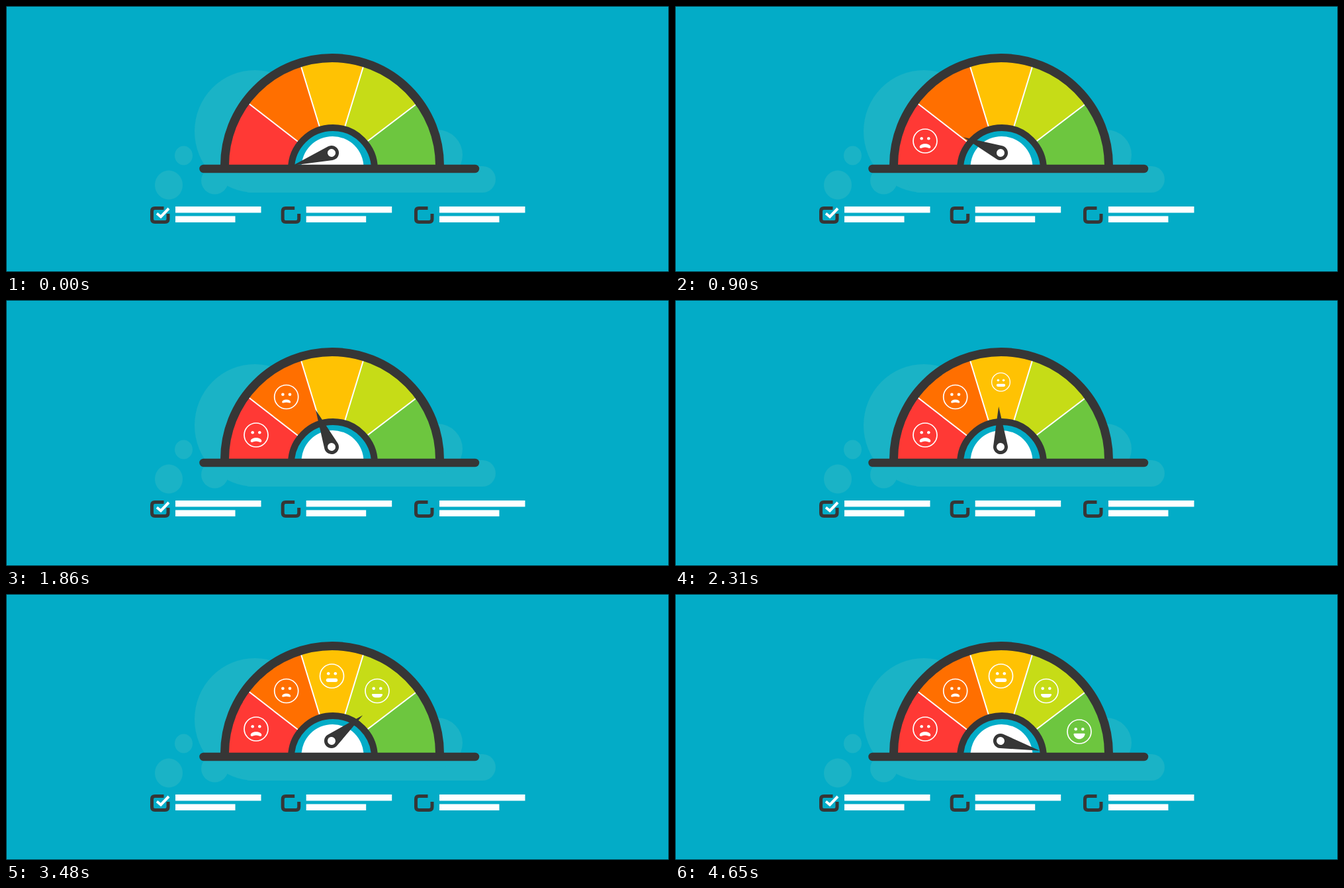
Write an HTML page that moves like this. It is 1002 px wide and 402 px high and loops after 5610 ms.

```html
<!DOCTYPE html>
<html lang="en">
<head>
<meta charset="utf-8">
<title>Satisfaction gauge</title>
<style>
  html, body { margin: 0; width: 100%; height: 100%; overflow: hidden; background: #03acc7; }
  svg { display: block; width: 100%; height: 100%; }
</style>
</head>
<body>
<svg viewBox="0 0 1002 402">
  <defs>
    <clipPath id="dial"><path d="M335 246V241A158 158 0 0 1 651 241V246Z"/></clipPath>
    <clipPath id="above"><rect width="1002" height="246"/></clipPath>
    <g id="item">
      <path d="M20.5 2.5H7Q2.5 2.5 2.5 7V19Q2.5 23.5 7 23.5H22.5Q27 23.5 27 19V11" fill="none" stroke="#363636" stroke-width="5"/>
      <path d="M38 0H167.5V9.5H38ZM38 14.5H128.5V24H38Z" fill="#fff"/>
    </g>
    <g id="head">
      <circle r="18" fill="none" stroke="#fff" stroke-width="1.7"/>
      <circle cx="-5.3" cy="-3.7" r="2.3"/>
      <circle cx="5.3" cy="-3.7" r="2.3"/>
    </g>
  </defs>

  <rect width="1002" height="402" fill="#03acc7"/>

  <g fill="#1ab3c6">
    <ellipse cx="376" cy="189.5" rx="91" ry="92.5"/>
    <rect x="350" y="242" width="390" height="40" rx="20"/>
    <circle cx="652" cy="225" r="38"/>
    <circle cx="315.5" cy="264" r="20.5"/>
    <ellipse cx="268.5" cy="226" rx="13.5" ry="14.5"/>
    <ellipse cx="246" cy="270.5" rx="21" ry="22"/>
  </g>

  <g clip-path="url(#dial)">
    <path d="M493 245L334 122V250H493Z" fill="#ff3935"/>
    <path d="M493 245L334 122V54H434.5Z" fill="#ff6f00"/>
    <path d="M493 245L434.5 54H551.5Z" fill="#ffc203"/>
    <path d="M493 245L551.5 54H652V124Z" fill="#c6dc17"/>
    <path d="M493 245L652 124V250H493Z" fill="#6dc63f"/>
    <path d="M334 122L493 245L434.5 54M551.5 54L493 245L652 124" fill="none" stroke="#fff" stroke-width="2"/>
  </g>
  <path d="M330.5 246V241A162.5 162.5 0 0 1 655.5 241V246" fill="none" stroke="#363636" stroke-width="13"/>
  <g clip-path="url(#above)">
    <circle cx="494" cy="247" r="63" fill="#03acc7" stroke="#363636" stroke-width="10"/>
    <circle cx="493.5" cy="244" r="47" fill="#fff"/>
  </g>
  <path d="M298.5 246H709" stroke="#363636" stroke-width="12.5" stroke-linecap="round"/>

  <use href="#item" x="218" y="303"/>
  <use href="#item" x="415.7" y="303"/>
  <use href="#item" x="617" y="303"/>
  <path d="M228 313.5L234 318.5L246 306" fill="none" stroke="#fff" stroke-width="4"/>

  <!-- Each face: centre and the time it starts to grow -->
  <g fill="#fff">
    <g class="face" data-x="378" data-y="204" data-start="120">
      <use href="#head"/>
      <path d="M-8.3 9C-8.3 2.5 8.3 2.5 8.3 9C8.3 11.5 6 11.3 4 10.2Q0 8.6 -4 10.2C-6 11.3 -8.3 11.5 -8.3 9Z"/>
    </g>
    <g class="face" data-x="423.7" data-y="146.5" data-start="930">
      <use href="#head"/>
      <path d="M-6.5 8C-6.5 2.5 6.5 2.5 6.5 8Q6.5 9.6 4.5 8.9Q0 7.6 -4.5 8.9Q-6.5 9.6 -6.5 8Z"/>
    </g>
    <g class="face" data-x="492.5" data-y="124" data-start="1940">
      <use href="#head"/>
      <path d="M-6 3.6H6A2.7 2.7 0 0 1 6 9H-6A2.7 2.7 0 0 1 -6 3.6Z"/>
    </g>
    <g class="face" data-x="561" data-y="146.5" data-start="2790">
      <use href="#head"/>
      <path d="M-7 4.4H7Q8.5 4.4 8 6Q6.5 10 2.5 10H-2.5Q-6.5 10 -8 6Q-8.5 4.4 -7 4.4Z"/>
    </g>
    <g class="face" data-x="611" data-y="208" data-start="3940">
      <use href="#head"/>
      <path d="M-7.5 2.8H7.5Q9 2.8 8.5 4.5C6 13.5 -6 13.5 -8.5 4.5Q-9 2.8 -7.5 2.8Z"/>
    </g>
  </g>
  <g id="needle">
    <path d="M-61 0L-2 -10.8A11 11 0 1 1 -2 10.8Z" fill="#363636"/>
    <circle r="6" fill="#fff"/>
  </g>

  <rect x=".5" y=".5" width="1001" height="401" fill="none" stroke="#02333c"/>
</svg>
<script>
  const LOOP = 5610, STEP = 30, SWEEP = 4650, GROW = 480;
  const faces = document.querySelectorAll('.face');
  const needle = document.getElementById('needle');

  function draw() {
    const t = Math.floor(performance.now() % LOOP / STEP) * STEP;
    const angle = -18 + 212 * Math.min(t / SWEEP, 1);
    needle.setAttribute('transform', `translate(492 222) rotate(${angle})`);
    for (const face of faces) {
      const { x, y, start } = face.dataset;
      const size = Math.min((t - start) / GROW, 1);
      face.setAttribute('display', size > 0 ? 'inline' : 'none');
      face.setAttribute('transform', `translate(${x} ${y}) scale(${Math.max(size, 0.01)})`);
    }
    requestAnimationFrame(draw);
  }
  draw();
</script>
</body>
</html>
```
